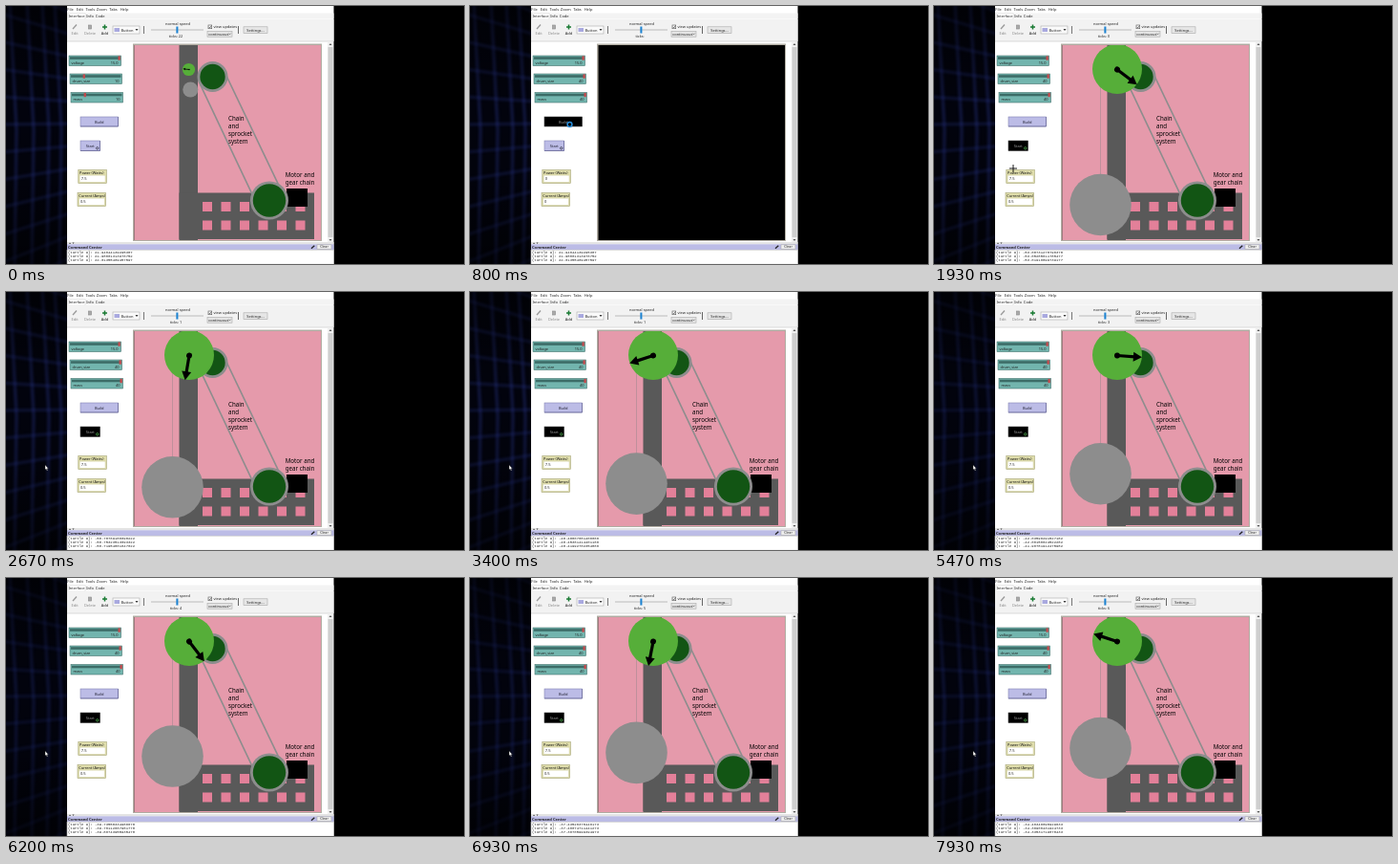
An HTML page with a canvas for the animation above (8000 ms loop, 480 by 270 pixels).

```html
<!DOCTYPE html>
<html lang="en">
<head>
<meta charset="utf-8">
<title>Chain and sprocket model</title>
<style>
html, body { margin: 0; width: 100%; height: 100%; overflow: hidden; background: #000; }
canvas { display: block; width: 480px; height: 270px; }
</style>
</head>
<body>
<canvas id="stage" width="480" height="270"></canvas>
<script>
const c = document.getElementById('stage').getContext('2d');
const STEPS = 120, STEP_MS = 8000 / STEPS;
const PINK = '#e59aab', GREY = '#8d8d8d', LAVENDER = '#bcbce6';
const SANS = '"Noto Sans", sans-serif', MONO = '"Liberation Mono", monospace';
const BUILD = 11, BUILT = 18, START = 22, DIM = 60;

// Each row: step, then one or more values.
const headings = [[22, 0], [29, 37], [51, 162], [82, 364], [104, 461], [119, 558]];
const heights = [[22, -54.47520148331906], [29, -53.01916899739177], [51, -48.41992702354866],
  [82, -41.96781912475982], [104, -37.36705999394973], [119, -34.33531719878433]];
const pointer = [[1, 80, 77], [4, 119, 77], [5, 80, 96], [8, 120, 96], [11, 104, 124], [16, 104, 124],
  [20, 88, 147], [24, 88, 147], [29, 83, 170], [36, 41, 183]];

function at(keys, step) {
  if (step <= keys[0][0]) return keys[0].slice(1);
  for (let i = 1; i < keys.length; i++) {
    const [a, b] = [keys[i - 1], keys[i]];
    if (step <= b[0]) {
      const k = (step - a[0]) / (b[0] - a[0]);
      return b.slice(1).map((v, j) => k === 1 ? v : a[j + 1] + (v - a[j + 1]) * k);
    }
  }
  return keys[keys.length - 1].slice(1);
}

function rect(x, y, w, h, fill, stroke) {
  c.fillStyle = fill;
  c.fillRect(x, y, w, h);
  if (stroke) {
    c.strokeStyle = stroke;
    c.lineWidth = 0.6;
    c.strokeRect(x, y, w, h);
  }
}
function disc(x, y, r, fill) {
  c.fillStyle = fill;
  c.beginPath();
  c.arc(x, y, r, 0, 7);
  c.fill();
}
function ring(x, y, r, color, width) {
  c.strokeStyle = color;
  c.lineWidth = width;
  c.beginPath();
  c.arc(x, y, r, 0, 7);
  c.stroke();
}
function line(color, width, ...points) {
  c.strokeStyle = color;
  c.lineWidth = width;
  c.beginPath();
  points.forEach(([x, y]) => c.lineTo(x, y));
  c.stroke();
}
function polygon(fill, ...points) {
  c.fillStyle = fill;
  c.beginPath();
  points.forEach(([x, y]) => c.lineTo(x, y));
  c.closePath();
  c.fill();
}
function text(s, x, y, { size = 4, color = '#222', align = 'left', family = SANS, weight = 400 } = {}) {
  c.font = `${weight} ${size}px ${family}`;
  c.fillStyle = color;
  c.textAlign = align;
  c.fillText(s, x, y);
}

// A blurred blue grid whose cells shrink towards the right.
function backdrop(step) {
  rect(0, 0, 480, 270, '#000');
  c.save();
  c.beginPath();
  c.rect(0, 0, 64, 270);
  c.clip();
  rect(0, 0, 64, 270, '#02030d');
  c.globalAlpha = step < DIM ? 1 : 0.75;
  c.filter = 'blur(1.5px)';
  for (const x of [9, 27, 43, 56])
    line('rgba(44,58,150,.46)', 2.6, [x - 5, -5], [x + 2, 130], [x, 275]);
  for (let y = -50; y < 320; y += 29)
    line('rgba(44,58,150,.42)', 2.2, [-5, y], [70, 120 + (y - 120) * 0.8]);
  c.filter = 'none';
  c.globalAlpha = 1;
  const shade = c.createLinearGradient(0, 0, 0, 270);
  shade.addColorStop(0, 'rgba(0,0,0,.55)');
  shade.addColorStop(0.4, 'rgba(0,0,0,0)');
  shade.addColorStop(0.65, 'rgba(0,0,0,.1)');
  shade.addColorStop(1, 'rgba(0,0,0,.6)');
  rect(0, 0, 64, 270, shade);
  c.restore();
}

function toolbar(ticks) {
  rect(64, 0, 279.5, 270, '#fff');
  [['File', 67.5], ['Edit', 77.3], ['Tools', 88.3], ['Zoom', 100.3], ['Tabs', 112.5], ['Help', 124]]
    .forEach(([s, x]) => text(s, x, 4.6, { align: 'center' }));
  rect(64, 7.5, 279.5, 6, '#f3f3f3');
  rect(65, 7.5, 18, 6.5, '#fff', '#ddd');
  [['Interface', 74], ['Info', 88], ['Code', 98.7]].forEach(([s, x]) => text(s, x, 12.3, { align: 'center' }));
  rect(64, 14, 279.5, 23, '#f2f2f2');
  line('#ccc', 0.7, [64, 37], [343, 37]);

  line('#999', 1.3, [70, 24], [74, 19.5]);
  text('Edit', 72, 30.1, { align: 'center', color: '#888' });
  rect(86.5, 20, 3, 4, '#aaa', '#888');
  text('Delete', 88, 30.1, { align: 'center', color: '#888' });
  line('#187a32', 1.5, [101, 22], [106, 22]);
  line('#187a32', 1.5, [103.5, 19.5], [103.5, 24.5]);
  text('Add', 103.5, 30.1, { align: 'center' });
  rect(112, 21, 28, 8, '#fafafa', '#aaa');
  rect(113.5, 23, 5.5, 4, '#a9a9df');
  text('Button', 120.5, 26.6);
  polygon('#333', [135.5, 24], [138.5, 24], [137, 26]);
  line('#777', 1, [144.5, 21], [144.5, 29]);

  text('normal speed', 180, 20.2, { align: 'center' });
  line('#aaa', 0.8, [152, 25], [207, 25]);
  rect(178.4, 21.5, 2, 7, '#1b82d1');
  text(ticks === null ? 'ticks:' : 'ticks: ' + ticks, 178, 32.6, { align: 'center', size: 3.8 });
  rect(212, 20, 3.7, 3.7, '#fff', '#555');
  line('#333', 0.6, [212.7, 21.8], [213.6, 23], [215.2, 20.6]);
  text('view updates', 217.5, 23.4);
  rect(211, 26.5, 26, 5.7, '#e4e4e4', '#aaa');
  text('continuous', 212.3, 30.7);
  line('#444', 0.6, [233.3, 28.6], [234.5, 29.8], [235.7, 28.6]);
  line('#666', 1, [243.5, 21], [243.5, 29]);
  rect(249, 21.8, 25, 6.8, '#e6e6e6', '#aaa');
  text('Settings...', 261.5, 26.6, { align: 'center' });
}

function slider(x, y, name, value, share) {
  rect(x, y, 54.5, 10.5, '#72b5ae', '#42716c');
  rect(x + 1, y + 1.2, 52.5, 2.6, '#3c6c67');
  rect(x + 1 + share * 50.5, y + 0.4, 2.3, 4.3, '#c4494c');
  text(name, x + 2.5, y + 8.8, { size: 3.9 });
  text(value, x + 51.5, y + 8.8, { size: 3.9, align: 'right' });
}
function button(x, y, w, h, name, pressed) {
  rect(x, y, w, h, pressed ? '#000' : LAVENDER, pressed ? '#333' : '#8484b4');
  if (!pressed) line('#6c6c9c', 0.8, [x, y + h], [x + w, y + h], [x + w, y]);
  text(name, x + w / 2, y + h / 2 + 1.5, { align: 'center', color: pressed ? '#999' : '#223' });
}
function monitor(x, y, name, value) {
  rect(x, y, 29.5, 14, '#dfddab', '#a5a374');
  text(name, x + 1.3, y + 4.2, { size: 3.9, color: '#111' });
  rect(x + 1.3, y + 5.6, 27, 7.4, '#fff', '#cfcda0');
  text(value, x + 3, y + 10.7);
}

function controls(step) {
  const drag = from => Math.min(1, Math.max(0.25, 0.25 + (step - from) / 4));
  const drum = drag(1), mass = drag(5);
  slider(66, 52, 'voltage', '15.0', 1);
  slider(67, 71, 'drum_size', Math.round(drum * 40), drum);
  slider(68, 90.5, 'mass', Math.round(mass * 40), mass);
  button(78, 116, 39.5, 10, 'Build', step >= BUILD && step < 16);
  button(78, 141, 20.5, 10.5, 'Start', step >= START);
  ring(95.7, 148.8, 1.2, step >= START ? '#4fae4f' : '#334', 0.8);
  const idle = step >= BUILD && step < START;
  monitor(75.8, 171.5, 'Power (Watts)', idle ? '0' : '7.5');
  monitor(75, 195.5, 'Current (Amps)', idle ? '0' : '0.5');
}

function arrow(x, y, degrees, scale) {
  c.save();
  c.translate(x, y);
  c.rotate(degrees * Math.PI / 180);
  c.scale(scale, scale);
  disc(0, 0, 3, '#000');
  line('#000', 3.2, [0, 0], [19, 0]);
  polygon('#000', [26, 0], [17, -5], [17, 5]);
  c.restore();
}

function view(step) {
  rect(133, 39.5, 198, 206.5, '#b0aca2');
  rect(134.5, 41, 195.5, 204, '#000');
  if (step >= BUILD - 1 && step < BUILT) return;
  c.save();
  c.beginPath();
  c.rect(134.5, 41, 195.5, 204);
  c.clip();
  rect(134, 40, 197, 206, PINK);
  rect(181.5, 40, 19.5, 206, '#595959');
  rect(181.5, 195.5, 141.5, 48.5, '#595959');
  for (let i = 0; i < 6; i++)
    for (const y of [205, 224.5]) rect(206 + i * 19.5, y, 10, 10, '#e38099');
  rect(294, 191, 22, 19, '#000');
  line(GREY, 1.7, [203.5, 82], [258, 197]);
  line(GREY, 1.7, [230.5, 72], [287, 190]);
  for (const [x, y, r] of [[216.5, 74, 16], [276, 203.5, 20]]) {
    disc(x, y, r, GREY);
    disc(x, y, r - 2.8, '#125514');
  }
  if (step < BUILD) {
    disc(193.3, 87.5, 8, GREY);
    disc(191.5, 66.5, 6.6, '#56ae39');
    arrow(192, 66.5, 186, 0.25);
  } else {
    const y = 122.9 - 1.605 * at(heights, step)[0];
    line('#b58f97', 0.8, [174.5, 66], [174.5, y]);
    disc(174.5, y, 32.3, GREY);
    disc(192, 66, 26, '#56ae39');
    arrow(192, 66.5, at(headings, step)[0], 1);
  }
  const label = { size: 6.2, color: '#000', weight: 500 };
  ['Chain', 'and', 'sprocket', 'system'].forEach((s, i) => text(s, 233, 120 + i * 8, label));
  ['Motor and', 'gear chain'].forEach((s, i) => text(s, 292.7, 178.7 + i * 8, label));
  c.restore();
}

function commandCenter(step) {
  rect(337, 37.5, 6, 210, '#f0f0f0');
  rect(337.5, 43, 5, 199, '#cfcfcf');
  polygon('#555', [338.5, 41], [341.5, 41], [340, 39]);
  polygon('#555', [338.5, 244], [341.5, 244], [340, 246]);
  rect(64, 247, 279.5, 2.3, '#e4e4e4');
  polygon('#444', [66, 249], [68, 249], [67, 247.6]);
  polygon('#444', [69.5, 247.6], [71.5, 247.6], [70.5, 249]);
  rect(64, 249.3, 279.5, 5.9, LAVENDER);
  text('Command Center', 65, 253.7, { size: 4.1, weight: 700 });
  line('#222', 1.3, [320, 253.8], [323.3, 250.8]);
  rect(326, 249.8, 15, 4.6, '#eee', '#aaa');
  text('Clear', 333.5, 253.3, { size: 3.6, align: 'center' });
  rect(64, 255.2, 279.5, 15, '#fff', '#bbb');
  const last = at(heights, step)[0];
  const values = step < START
    ? [21.94044139295387, 21.98001313976752, 22.01355409457597]
    : [last - 0.068143790512, last - 0.033687120463, last];
  values.forEach((v, i) => text('(turtle 9): ' + v.toFixed(14), 65, 258.9 + i * 4.2, { size: 3.9, family: MONO }));
}

function cursor(step) {
  if (step < 1) return;
  const [x, y] = at(pointer, step);
  if (step >= BUILD && step < BUILT) {
    ring(x + 0.5, y, 2.4, '#2a8fdc', 1.5);
  } else if (step >= 27 && step < 33) {
    line('#000', 0.9, [x - 4, y], [x + 4, y]);
    line('#000', 0.9, [x, y - 4], [x, y + 4]);
  } else {
    const shape = [[0, -2], [0, 3], [1.1, 2.1], [2, 4], [2.8, 3.6], [2, 1.8], [3.4, 1.7], [0, -2]]
      .map(([dx, dy]) => [x + dx, y + dy]);
    polygon('#fff', ...shape);
    line('#222', 0.4, ...shape);
  }
}

function draw(step) {
  backdrop(step);
  toolbar(step < BUILD ? 22 : step < BUILT ? null : Math.max(0, Math.floor((step * STEP_MS - 1500) / 1000)));
  controls(step);
  view(step);
  commandCenter(step);
  cursor(step);
}

let shown = -1;
function tick(now) {
  const step = Math.floor((now + 5) / STEP_MS) % STEPS;
  if (step !== shown) draw(shown = step);
  requestAnimationFrame(tick);
}
draw(0);
requestAnimationFrame(tick);
</script>
</body>
</html>
```
